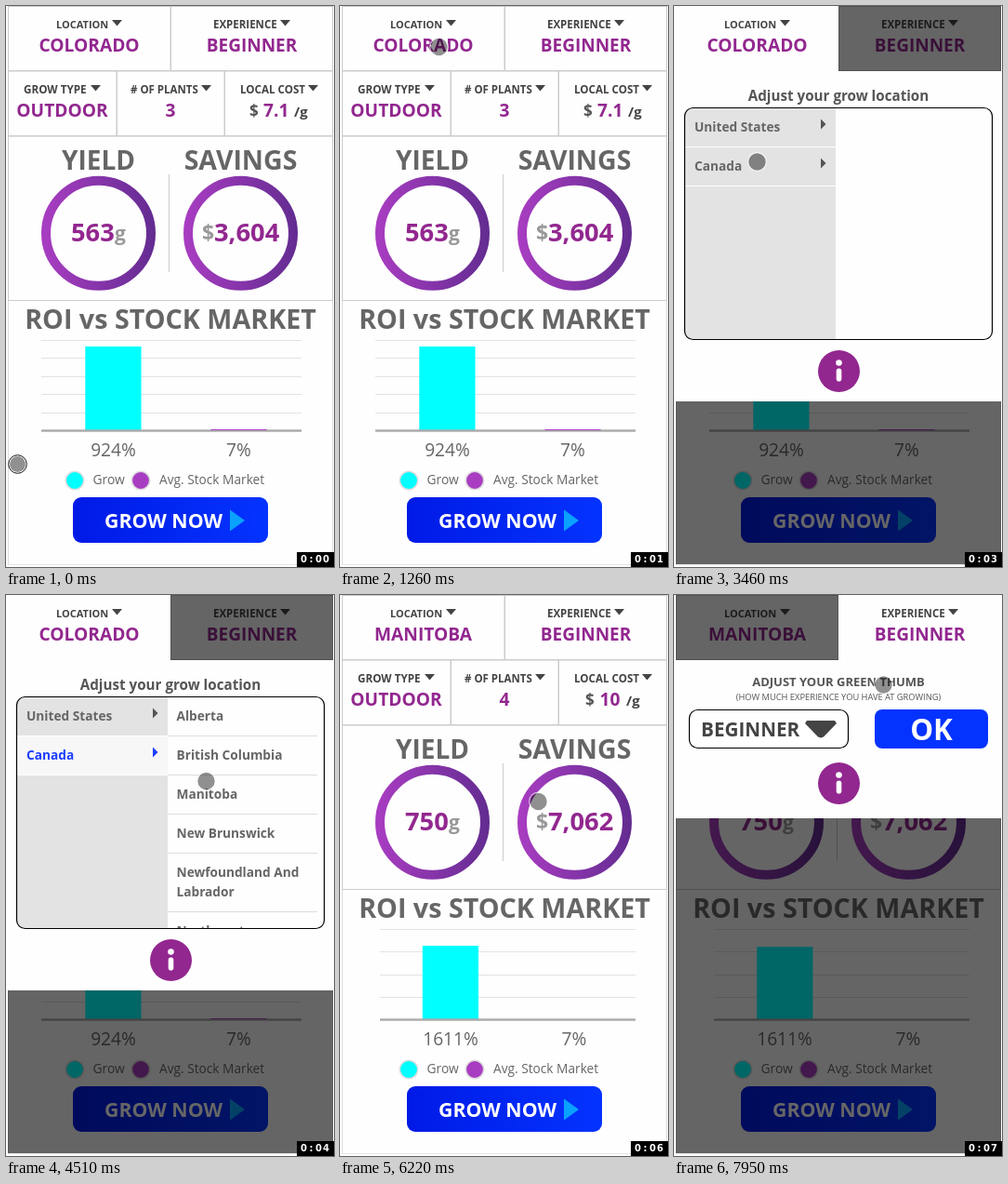
These frames come from a looping animation (353 by 603 pixels, 8000 ms). An HTML page with a canvas:

```html
<!DOCTYPE html>
<html lang="en">
<head>
<meta charset="utf-8">
<style>
  html, body { margin: 0; overflow: hidden; background: #fefefe; }
  canvas { display: block; }
</style>
</head>
<body>
<canvas id="stage" width="353" height="603"></canvas>
<script>
const c = document.getElementById('stage').getContext('2d');
const LOOP = 8000, PURPLE = '#92278f', VIOLET = '#a93dc2', PAPER = '#fefefe';
const INK = '#444', GREY = '#666', LINE = '#ccc';

const before = { place: 'COLORADO', plants: '3', cost: '7.1', costX: [262, 277, 310], grams: '563',
  saved: '3,604', roi: '924%', labels: [115.5, 250.5], left: 38, steps: 5, top: 366, barX: 85.3 };
const after = { place: 'MANITOBA', plants: '4', cost: '10', costX: [264, 279.5, 308], grams: '750',
  saved: '7,062', roi: '1611%', labels: [119, 252], left: 43, steps: 4, top: 378.2, barX: 89.2 };

// Times in ms
const OPEN_PLACE = 1830, SHOW_LIST = 3860, CLOSE_PLACE = 5620, GROW_BAR = 5780, OPEN_SKILL = 7500;
const presses = [[0, 20], [1690, 1830], [3690, 3860], [5470, 5620], [7440, 7500]];
const seconds = [1040, 2010, 3020, 3980, 4900, 5900, 6900];
const pointer = [
  [0, 12.5, 492.5], [260, 12.5, 492.5], [1040, 91.5, 71], [1260, 106.5, 44], [1400, 109.5, 35],
  [1690, 103.5, 25.5], [2440, 103.5, 25.5], [2870, 92.5, 139.5], [3230, 92.5, 139.5],
  [3460, 89.5, 167.5], [3540, 90.5, 167.5], [4210, 90.5, 167.5], [4510, 215.5, 200],
  [4690, 213.5, 222], [6660, 213.5, 222], [7300, 252, 18.5], [7440, 254.5, 21.5],
  [7740, 254.5, 21.5], [7950, 225.5, 96.5], [8000, 225.5, 96.5]
];

function text(str, x, y, size, color = INK, align = 'center', weight = 700) {
  c.font = `${weight} ${size}px "Open Sans", sans-serif`;
  c.textAlign = align;
  c.fillStyle = color;
  c.fillText(str, x, y);
}
function rect(x, y, w, h, color) {
  c.fillStyle = color;
  c.fillRect(x, y, w, h);
}
function poly(color, ...pts) {
  c.beginPath();
  pts.forEach(([x, y]) => c.lineTo(x, y));
  c.closePath();
  c.fillStyle = color;
  c.fill();
}
function circle(x, y, r, fill, stroke, width = 1) {
  c.beginPath();
  c.arc(x, y, r, 0, 7);
  if (fill) { c.fillStyle = fill; c.fill(); }
  if (stroke) { c.strokeStyle = stroke; c.lineWidth = width; c.stroke(); }
}
function box(x, y, w, h, r, fill, stroke) {
  c.beginPath();
  c.roundRect(x, y, w, h, r);
  if (fill) { c.fillStyle = fill; c.fill(); }
  if (stroke) { c.strokeStyle = stroke; c.lineWidth = 1.2; c.stroke(); }
}
function gradient(x0, x1, from, to) {
  const g = c.createLinearGradient(x0, 0, x1, 0);
  g.addColorStop(0, from);
  g.addColorStop(1, to);
  return g;
}

function label(str, x, y, size, arrowX) {
  text(str, x, y, size, INK, 'left');
  poly(INK, [arrowX, y - 9], [arrowX + 11, y - 9], [arrowX + 5.5, y - 2.5]);
}
function placeTile(d) {
  label('LOCATION', 54, 24, 11, 114);
  text(d.place, 89.5, 49, 19.2, PURPLE);
}
function skillTile() {
  label('EXPERIENCE', 223, 24, 11.5, 295);
  text('BEGINNER', 264.5, 49, 19, PURPLE);
}

function header(d) {
  rect(2, 0, 1, 600, '#ddd');
  rect(351, 0, 1, 600, '#ddd');
  rect(2, 600, 350, 1, '#e4e4e4');
  rect(2, 0, 350, 1, LINE);
  rect(2, 0, 1, 317, LINE);
  rect(351, 0, 1, 317, LINE);
  for (const y of [69, 139]) rect(2, y, 350, 1.5, LINE);
  rect(2, 316, 350, 1, LINE);
  rect(176.5, 0, 1.5, 70, LINE);
  for (const x of [118.5, 234.5]) rect(x, 70, 1.5, 70, LINE);
  placeTile(d);
  skillTile();
  label('GROW TYPE', 19, 94, 11.7, 91);
  label('# OF PLANTS', 134, 94, 11.5, 210);
  label('LOCAL COST', 252, 94, 11.6, 325);
  text('OUTDOOR', 60.5, 119, 19.2, PURPLE);
  text(d.plants, 177, 119, 19.2, PURPLE);
  text('$', d.costX[0], 119, 17, '#555', 'left');
  text(d.cost, d.costX[1], 119, 19.2, PURPLE, 'left');
  text('/g', d.costX[2], 119, 15, INK, 'left');
}

function totals(d) {
  text('YIELD', 99.5, 176, 28, GREY);
  text('SAVINGS', 252.5, 176, 28.5, GREY);
  for (const x of [99.5, 252.5])
    circle(x, 244.3, 56.5, null, gradient(x - 61, x + 61, VIOLET, '#632c91'), 10);
  rect(175, 181, 1, 105, LINE);
  text(d.grams, 70, 253, 27.3, PURPLE, 'left');
  text('g', 117, 252, 21, '#999', 'left');
  text('$', 211, 252, 23, '#999', 'left');
  text(d.saved, 224, 253, 27.3, PURPLE, 'left');
}

function chart(d, t) {
  const p = Math.min(1, Math.max(0, (t - GROW_BAR) / 1000));
  const ease = 1 - (1 - p) ** 4;
  const between = key => before[key] + (after[key] - before[key]) * ease;
  const top = between('top');
  text('ROI vs STOCK MARKET', 177, 347, 28.7, GREY);
  for (let i = 0; i < d.steps; i++)
    rect(d.left, Math.round(359 + i * 97.4 / d.steps), 318 - d.left, 1, '#e2e2e2');
  rect(between('barX'), top, 60.2, 456 - top, '#0ff');
  rect(d.left, 455.3, 318 - d.left, 2.4, '#aaa');
  if (d === before) rect(220.5, 455, 60, 1, VIOLET);
  text(d.roi, d.labels[0], 484, 19.2, GREY, 'center', 400);
  text('7%', d.labels[1], 484, 19.2, GREY, 'center', 400);
  circle(74, 510, 9.7, '#0ff', '#ddd', 1.6);
  circle(145, 510, 9.7, VIOLET, '#ddd', 1.6);
  text('Grow', 93.5, 514, 13.8, GREY, 'left', 400);
  text('Avg. Stock Market', 165, 514, 13.7, GREY, 'left', 400);
  box(72, 528, 210, 49, 9, gradient(72, 282, '#001ae6', '#0433ff'));
  text('GROW NOW', 169.5, 560.5, 21.3, '#fff');
  poly('#0aa2ff', [241, 541.5], [257, 553], [241, 564.5]);
}

function info(y) {
  circle(177.5, y, 22.5, PURPLE);
  circle(177.5, y - 9, 3.3, '#fff');
  box(174.7, y - 3, 5.6, 14, 2.8, '#fff');
}

function dim(tileX, height) {
  rect(2, 0, 350, 600, 'rgba(0,0,0,.6)');
  rect(tileX, 0, 175, 71, PAPER);
  rect(2, 70, 350, height, PAPER);
}

function placePanel(d, listed) {
  dim(2, 355);
  placeTile(d);
  text('Adjust your grow location', 177, 102, 15.2, '#555');
  c.save();
  box(11.5, 109.5, 331, 249, 9, PAPER);
  c.clip();
  rect(12, 110, 162, 249, '#e3e3e3');
  if (listed) rect(12, 152, 162, 42, '#f7f7f7');
  ['United States', 'Canada'].forEach((name, i) => {
    const y = 110 + i * 42, on = listed && i === 1;
    rect(12, y + 41, 162, 1, '#fff');
    text(name, 22, y + 25, 13.7, on ? '#1f3fff' : GREY, 'left');
    poly(on ? '#1f3fff' : '#555', [158, y + 11.5], [163.5, y + 17], [158, y + 22.5]);
  });
  if (listed) {
    let y = 110;
    for (const name of ['Alberta', 'British Columbia', 'Manitoba', 'New Brunswick',
      'Newfoundland And|Labrador', 'Northwest|Territories']) {
      const lines = name.split('|');
      lines.forEach((s, i) => text(s, 183.5, y + 25 + i * 21, 13.7, GREY, 'left'));
      y += 21 + lines.length * 21;
      rect(174, y - 1, 161, 1, '#ddd');
    }
  }
  c.restore();
  box(11.5, 109.5, 331, 249, 9, null, '#000');
  info(392.5);
}

function skillPanel() {
  dim(177, 170);
  skillTile();
  text('ADJUST YOUR GREEN THUMB', 177, 98, 13, '#555');
  text('(HOW MUCH EXPERIENCE YOU HAVE AT GROWING)', 177, 113, 9.3, '#555', 'center', 400);
  box(16.5, 123.5, 171, 41, 9, '#fff', '#000');
  text('BEGINNER', 29, 151.5, 20.7, INK, 'left');
  poly(INK, [143, 135], [173, 135], [175, 138], [161, 152.5], [158, 153.5], [155, 152.5], [141, 138]);
  box(216, 123, 122, 42, 8, '#0433ff');
  text('OK', 277, 156, 31.3, '#fff');
  info(202.5);
}

// Monotone cubic path through the pointer's keys
function along(axis, t) {
  const i = Math.max(0, pointer.findIndex(k => k[0] > t) - 1);
  const slope = n => pointer[n] && pointer[n + 1]
    ? (pointer[n + 1][axis] - pointer[n][axis]) / (pointer[n + 1][0] - pointer[n][0]) : 0;
  const tangent = n => {
    const a = slope(n - 1), b = slope(n);
    return a * b > 0 ? 2 * a * b / (a + b) : 0;
  };
  const [p, q] = [pointer[i], pointer[i + 1]], h = q[0] - p[0], u = (t - p[0]) / h;
  const s = u * u * (3 - 2 * u);
  return p[axis] * (1 - s) + q[axis] * s
    + h * u * (1 - u) * (tangent(i) * (1 - u) - tangent(i + 1) * u);
}

function cursor(t) {
  const x = along(1, t), y = along(2, t);
  const pressed = presses.some(([a, b]) => t >= a && t < b);
  if (pressed) circle(x, y, 9.8, '#fff', '#111');
  else circle(x, y, 9.8, null, 'rgba(255,255,255,.6)', 1.4);
  circle(x, y, pressed ? 8.5 : 9.2, 'rgba(0,0,0,.43)');
}

function clock(t) {
  rect(313, 587, 40, 16, '#000');
  c.font = 'bold 10px "DejaVu Sans", sans-serif';
  c.textAlign = 'center';
  c.fillStyle = '#fff';
  [...'0:0' + seconds.filter(s => t >= s).length].forEach((ch, i) => c.fillText(ch, 320.5 + i * 8, 598));
}

function draw(now) {
  const t = now % LOOP, d = t < CLOSE_PLACE ? before : after;
  rect(0, 0, 353, 603, PAPER);
  header(d);
  totals(d);
  chart(d, t);
  if (t >= OPEN_PLACE && t < CLOSE_PLACE) placePanel(d, t >= SHOW_LIST);
  if (t >= OPEN_SKILL) skillPanel();
  cursor(t);
  clock(t);
}

let start;
function tick(now) {
  start ??= now;
  draw(now - start);
  requestAnimationFrame(tick);
}
draw(0);
requestAnimationFrame(tick);
</script>
</body>
</html>
```
